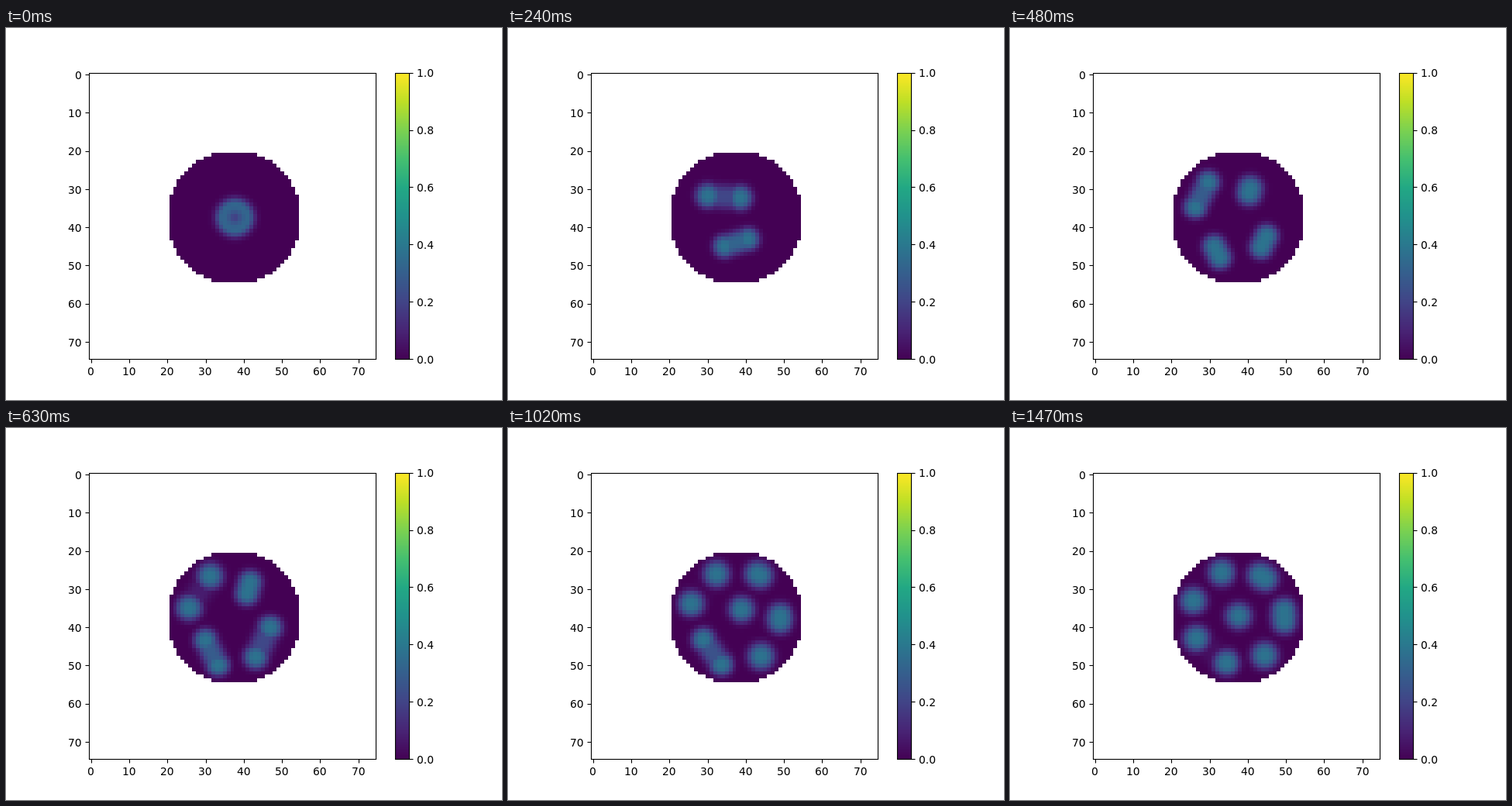
Animation, 640 px wide and 480 px high, one loop 1.5 s. Source, as an HTML page with a canvas:

```html
<!DOCTYPE html>
<html lang="en">
<head>
<meta charset="utf-8">
<title>Dividing spots</title>
<style>
  html, body { margin: 0; width: 100%; height: 100%; overflow: hidden; background: #fff; }
  canvas { display: block; }
</style>
</head>
<body>
<canvas id="stage" width="640" height="480"></canvas>
<script>
const ctx = document.getElementById('stage').getContext('2d');
const LOOP = 1500, STEP = 30, BIRTH = 240;
const GRID = 75, MID = 37.5, RADIUS = 17.5, CELL = 370 / GRID;
const PEAK = 0.38;
const AXES = { left: 107.2, right: 476.8, top: 57.6, bottom: 427.2 };
const BAR = { left: 501.6, right: 520.08, top: 57.6, bottom: 427.2 };

const clamp = x => Math.min(1, Math.max(0, x));
const snap = x => Math.floor(x + 0.5) + 0.5;
const mix = (a, b, u) => ({ x: a.x + (b.x - a.x) * u, y: a.y + (b.y - a.y) * u });
const distance = (a, b) => Math.hypot(a.x - b.x, a.y - b.y);
const at = (x, y, stretch = 0) => ({ x, y, stretch });
const centre = at(MID, MID);

// Viridis, sampled every tenth and quantised to 256 levels
const viridis = '440154 482475 414487 355f8d 2a788e 21918c 22a884 44bf70 7ad151 bddf26 fde725'
  .split(' ').map(hex => [0, 2, 4].map(i => parseInt(hex.slice(i, i + 2), 16)));
const palette = Array.from({ length: 256 }, (_, level) => {
  const pos = level / 25.5, i = Math.min(9, Math.floor(pos));
  const rgb = viridis[i].map((c, k) => Math.round(c + (viridis[i + 1][k] - c) * (pos - i)));
  return `rgb(${rgb})`;
});
const colour = v => palette[Math.min(255, Math.floor(clamp(v) * 256))];

// Each parent spot is born from the ring, parts into twins, and the twins settle.
// In grid cells; a settled twin may end up stretched along the wall.
const parents = [
  { born: at(30.1, 31.8), partTime: 520, pace: 0.5,
    parted: [at(30.2, 27.2), at(25.7, 35.9)], settled: [at(33.1, 25.8), at(25.8, 33.1)] },
  { born: at(38.6, 32.3), partTime: 870, pace: 0.4,
    parted: [at(42.8, 25.6), at(40.7, 33.1)], settled: [at(43.9, 26.9, 0.8), at(37.6, 37.1)] },
  { born: at(34.4, 45.0), partTime: 600, pace: 1.6,
    parted: [at(30.0, 43.5), at(33.2, 49.9)], settled: [at(26.6, 43.0), at(34.4, 49.3)] },
  { born: at(40.6, 43.2), partTime: 660, pace: 0.35,
    parted: [at(47.2, 39.6), at(42.9, 48.4)], settled: [at(49.5, 37.1, 1.4), at(44.4, 47.4)] }
];

function twinsAt({ born, partTime, pace, parted, settled }, t) {
  if (t < BIRTH) {
    const onRing = mix(centre, born, 3.4 / distance(centre, born));
    const p = mix(onRing, born, t / BIRTH);
    return [p, p];
  }
  if (t < partTime) {
    const u = (t - BIRTH) / (partTime - BIRTH);
    const middle = mix(parted[0], parted[1], 0.5);
    const p = mix(born, middle, u * (2 - u));
    return parted.map(q => at(p.x + (q.x - middle.x) * u * u, p.y + (q.y - middle.y) * u * u));
  }
  const u = ((t - partTime) / (LOOP - STEP - partTime)) ** pace;
  return parted.map((p, i) => mix(p, settled[i], u));
}

// Spots get slimmer while they pull apart
const girth = gap => 3.45 - 0.55 * Math.sin(Math.PI * clamp(gap / 10.5));

function joinPair(a, b) {
  const gap = distance(a, b), radius = girth(gap);
  return [
    { a, b: a, radius, strength: 1 },
    { a: b, b, radius, strength: 1 },
    { a, b, radius, strength: Math.sqrt(clamp((10.1 - gap) / 5)) }
  ];
}

function stretchAlongWall(p, amount) {
  const reach = amount / distance(p, centre);
  const dx = (MID - p.y) * reach, dy = (p.x - MID) * reach;
  return { a: at(p.x - dx, p.y - dy), b: at(p.x + dx, p.y + dy), radius: 3.3, strength: 1 };
}

function buildLinks(t) {
  const twins = parents.map(p => twinsAt(p, t));
  if (t <= BIRTH) {
    const [a, b, c, d] = twins.map(pair => pair[0]);
    return [...joinPair(a, b), ...joinPair(c, d)];
  }
  const links = twins.flatMap(pair => joinPair(...pair));
  const middles = twins.map(pair => mix(...pair, 0.5));
  links.push(joinPair(middles[0], middles[1])[2], joinPair(middles[2], middles[3])[2]);
  const late = clamp((t - 870) / 300);
  parents.forEach(({ settled }, k) => settled.forEach(({ stretch }, i) => {
    if (stretch * late) links.push(stretchAlongWall(twins[k][i], stretch * late));
  }));
  return links.filter(l => l.strength > 0);
}

function linkValue({ a, b, radius, strength }, x, y) {
  const dx = b.x - a.x, dy = b.y - a.y, len2 = dx * dx + dy * dy;
  const s = len2 ? clamp(((x - a.x) * dx + (y - a.y) * dy) / len2) : 0;
  const r = Math.hypot(x - a.x - s * dx, y - a.y - s * dy);
  return PEAK * strength * Math.exp(-((r / radius) ** 3));
}

function ringValue(x, y, t) {
  const off = Math.hypot(x - 37.7, y - 37.5) - 3.4 - t / 120;
  return 0.33 * Math.exp(-((off / (off < 0 ? 3.9 : 1.8)) ** 2));
}

function drawField(t) {
  const links = buildLinks(t);
  const ring = 1 - clamp(t / 130);
  for (let j = 0; j < GRID; j++) {
    for (let i = 0; i < GRID; i++) {
      if (Math.hypot(i - MID, j - MID) > RADIUS) continue;
      let v = 0;
      for (const l of links) v = Math.max(v, linkValue(l, i, j));
      if (ring) v += (ringValue(i, j, t) - v) * ring;
      const x = Math.round(107 + i * CELL), y = Math.round(57 + j * CELL);
      ctx.fillStyle = colour(v);
      ctx.fillRect(x, y, Math.round(107 + (i + 1) * CELL) - x, Math.round(57 + (j + 1) * CELL) - y);
    }
  }
}

function line(x1, y1, x2, y2) {
  ctx.beginPath();
  ctx.moveTo(x1, y1);
  ctx.lineTo(x2, y2);
  ctx.stroke();
}

function label(text, x, baseline, align) {
  ctx.fillText(text, Math.round(x - align * ctx.measureText(text).width), Math.ceil(baseline));
}

function frame(box) {
  const x = snap(box.left), y = snap(box.top);
  ctx.strokeRect(x, y, snap(box.right) - x, snap(box.bottom) - y);
}

function drawChart() {
  ctx.fillStyle = '#fff';
  ctx.fillRect(0, 0, 640, 480);
  for (let y = 58; y < 428; y++) {
    ctx.fillStyle = colour((427.5 - y) / 370);
    ctx.fillRect(502, y, 18, 1);
  }
  ctx.strokeStyle = ctx.fillStyle = '#000';
  ctx.lineWidth = 1.11;
  ctx.font = '13.89px "DejaVu Sans", sans-serif';
  frame(AXES);
  frame(BAR);
  for (let n = 0; n <= 70; n += 10) {
    const shift = (n + 0.5) * 4.928;
    const x = AXES.left + shift, y = AXES.top + shift;
    line(snap(x), 427.5, snap(x), 432.5);
    label(n, x - 0.25, 448, 0.5);
    line(102.5, snap(y), 107.5, snap(y));
    label(n, 97.5, y + 5.15, 1);
  }
  for (let n = 0; n <= 5; n++) {
    const y = BAR.bottom - n * 73.92;
    line(520.5, snap(y), 525.5, snap(y));
    label((n / 5).toFixed(1), 529.8, y + 5.15, 0);
  }
}

let shown = -1;
function tick() {
  const t = Math.floor(performance.now() % LOOP / STEP) * STEP;
  if (t !== shown) drawField(shown = t);
  requestAnimationFrame(tick);
}

drawChart();
tick();
</script>
</body>
</html>
```
